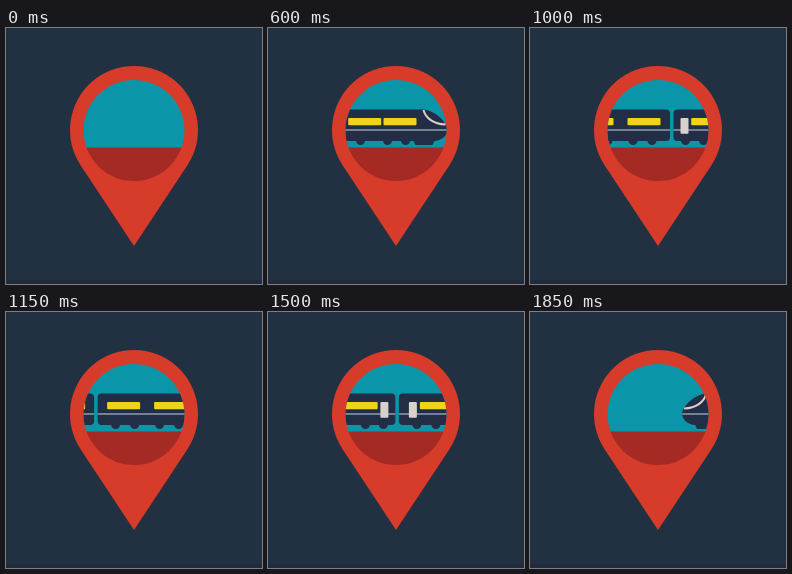
These frames come from a looping animation (256x256 px, 1.9 s). An HTML page:

```html
<!DOCTYPE html>
<html lang="en">
<head>
<meta charset="utf-8">
<title>Train in a map pin</title>
<style>
  html, body { margin: 0; width: 100%; height: 100%; overflow: hidden; background: #223142; }
  svg { display: block; width: 100vw; height: 100vh; }
  .body { fill: #222e46; }
  .window { fill: #f2d21b; }
  .door { fill: #d8d2cb; }
  .stripe { fill: none; stroke: #919bad; stroke-width: 1.3; }
  .shield { fill: none; stroke: #d8d2cb; stroke-width: 2; }
</style>
</head>
<body>
<svg viewBox="0 0 256 256">
  <defs>
    <clipPath id="porthole"><circle cx="128" cy="102.5" r="50.5"/></clipPath>
    <!-- Cars are drawn with x measured backwards from the front of the car. -->
    <g id="engine">
      <path class="body" d="M26 81.5H113q4 0 4 4V109q0 4-4 4H34L32 117H15L13 113H12C5 112 0 107 0 102C0 95 12 81.5 26 81.5Z"/>
      <path class="shield" d="M24 82C22 90 14 96 2 96.5"/>
      <path class="stripe" d="M0 102H117"/>
    </g>
    <g id="coach">
      <rect class="body" y="81.5" width="99" height="31.5" rx="4"/>
      <path class="stripe" d="M0 102H99"/>
    </g>
  </defs>
  <rect width="256" height="256" fill="#223142"/>
  <rect y="252" width="256" height="4" fill="#222a3d"/>
  <path fill="#d73b2a" d="M128 218L74.6 137.3A64 64 0 1 1 181.4 137.3Z"/>
  <g clip-path="url(#porthole)">
    <rect x="76" y="50" width="104" height="70" fill="#0a95a8"/>
    <rect x="76" y="119.5" width="104" height="35" fill="#a52a23"/>
    <g id="train"></g>
  </g>
</svg>
<script>
const train = document.getElementById('train');

const box = (kind, x, width, height) =>
  `<rect class="${kind}" x="${x}" y="90" width="${width}" height="${height}" rx="1"/>`;

function car(shape, transform, windows, doors, wheels) {
  return `<g transform="${transform}"><use href="#${shape}"/>` +
    windows.map(x => box('window', x, 33, 7.3)).join('') +
    doors.map(x => box('door', x, 8, 15.7)).join('') +
    wheels.map(x => `<circle class="body" cx="${x}" cy="112.5" r="4.5"/>`).join('') +
    '</g>';
}

const engine = transform =>
  car('engine', transform, [31, 66.3], [102], [42, 60, 87, 105]);
const coach = (x, windows, doors) =>
  car('coach', `translate(${x} 0)`, windows, doors, [18, 37, 62, 81]);

train.innerHTML =
  engine('translate(0 0)') +
  coach(120.5, [9.5, 56.5], []) +
  coach(223, [9, 45], [81]) +
  engine('translate(442.5 0) scale(-1 1)');

const LOOP = 1900, STEP = 50, START = 200, FASTER = 1050;
const SLOW = 0.2025, FAST = 0.405; // pixels per ms

function noseAt(time) {
  const slowPart = Math.min(time, FASTER) - START;
  const fastPart = Math.max(0, time - FASTER);
  return 98.5 + slowPart * SLOW + fastPart * FAST;
}

function draw(now) {
  const time = Math.floor(now % LOOP / STEP) * STEP;
  train.style.display = time < START ? 'none' : '';
  train.setAttribute('transform', `translate(${noseAt(time)} 0) scale(-1 1)`);
  requestAnimationFrame(() => draw(performance.now() - begin));
}

const begin = performance.now();
draw(0);
</script>
</body>
</html>
```
